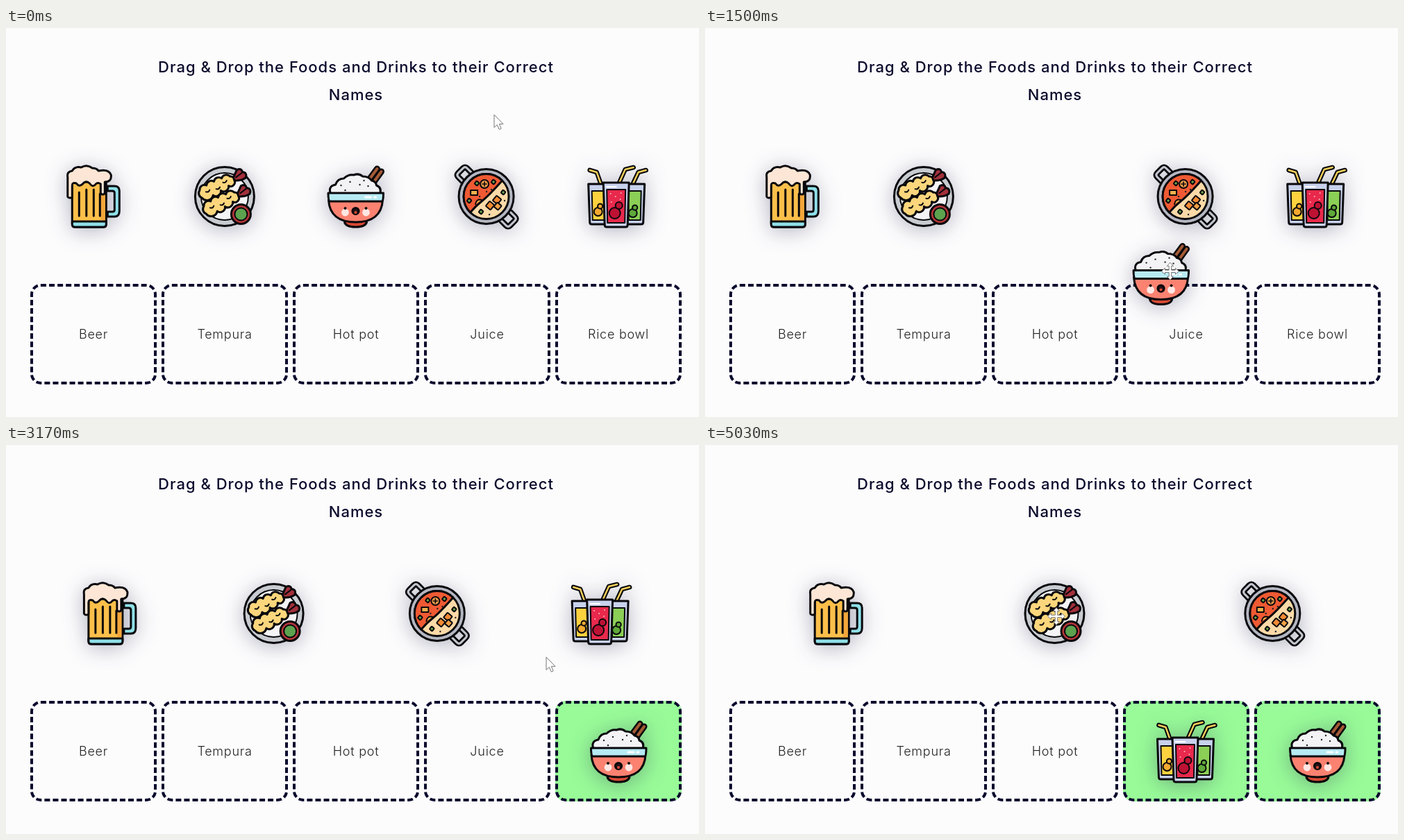
An HTML page for the animation above (5060 ms loop, 998 px wide and 561 px high).

```html
<!DOCTYPE html>
<html lang="en">
<head>
<meta charset="utf-8">
<title>Drag and drop</title>
<style>
html, body { margin: 0; width: 100%; height: 100%; overflow: hidden; background: #fcfcfd; }
#stage { position: relative; width: 998px; height: 561px; overflow: hidden; font-family: Inter, "Open Sans", sans-serif; }
h1 { position: absolute; left: 104px; top: 36px; width: 800px; margin: 0; text-align: center;
  font-size: 22px; font-weight: 500; line-height: 40px; letter-spacing: 1px; color: #0b0b2c; }
.box { position: absolute; top: 369px; width: 182px; height: 145px; box-sizing: border-box;
  border: 4px dashed #07072c; border-radius: 15px; display: flex; align-items: center; justify-content: center;
  font-size: 18px; font-weight: 300; letter-spacing: .75px; color: #222; }
.box.done { background: #98fb98; color: transparent; }
svg { position: absolute; left: 0; top: 0; overflow: visible; }
.icon { width: 92px; height: 92px; fill: none; stroke: #08080c; stroke-width: 3; stroke-linejoin: round;
  stroke-linecap: round; filter: drop-shadow(0 4px 15px rgba(30, 30, 70, .32)); }
.cursor { width: 30px; height: 30px; fill: #fff; stroke: #777; stroke-width: 1; stroke-linejoin: round; }
</style>
</head>
<body>
<div id="stage">
  <h1>Drag &amp; Drop the Foods and Drinks to their Correct<br>Names</h1>
</div>
<script>
const LOOP = 5060, BOWL_DROP = 2350, JUICE_DROP = 4400;
const stage = document.getElementById('stage');

const path = (d, fill = 'none', extra = '') => `<path d="${d}" fill="${fill}" ${extra}/>`;
const circle = (x, y, r, fill = 'none', extra = '') => `<circle cx="${x}" cy="${y}" r="${r}" fill="${fill}" ${extra}/>`;
const group = (transform, body) => `<g transform="${transform}">${body}</g>`;
const tube = (d, color, outer = 6.6, inner = 2.4) =>
  path(d, 'none', `stroke-width="${outer}"`) + path(d, 'none', `stroke="${color}" stroke-width="${inner}"`);
const dots = (points, r, fill) => points.map(([x, y]) => circle(x, y, r, fill, 'stroke="none"')).join('');
const bare = 'stroke="none"';
const thin = 'stroke-width="2"';

function beer() {
  const teal = '#8fe0e8';
  return path('M66 31H76q7 0 7 7V67q0 8-7 8H66V68H73q3 0 3-3V41q0-3-3-3H66z', teal)
    + path('M15 25V86q0 4 4 4H60q4 0 4-4V25z', '#fcbf4a')
    + path('M56 27H62.5V80H56z', '#f3a63a', bare)
    + path('M15 82H64V86q0 4-4 4H19q-4 0-4-4z', teal)
    + path('M25 40V74M35.5 36V74M46 36V74M55 42V74')
    + path('M8.5 46V18Q7 10 15 9Q19 2 28 4Q36-1 44 5Q50 5 53 9Q68 6 71 15Q72 25 62 25V40Q62 43 59 43T56 40V28Q52 25 49 28Q45 34 40 27Q35 22 30 28Q25 33 21 27Q15 25 15 30V46Q15 48 12 48T8.5 46Z', '#fde6d5');
}

function tempura() {
  const shrimp = path('M26-1L36-9Q43-9 42-3Q48 2 42 7Q34 8 26 3Z', '#a3303a')
    + path('M30 0L41-2', 'none', thin)
    + path('M-27 4a7 7 0 0 1 2-11a7 7 0 0 1 12-2a7 7 0 0 1 12 0a7 7 0 0 1 12 1a7 7 0 0 1 12 3a5 5 0 0 1 3 7a6 6 0 0 1-11 4a7 7 0 0 1-13 1a7 7 0 0 1-13 1a9 9 0 0 1-16-4z', '#fbd67c')
    + path('M-18-1q3 3 6 0M-3 2q3 3 6 0M10-2q3 3 6 0', 'none', thin);
  return circle(46, 46, 42.5, '#c8ccd1') + circle(46, 46, 34, '#f4f4f6', thin)
    + group('translate(35.5 32) rotate(-27)', shrimp)
    + group('translate(41.5 55) rotate(-27)', shrimp)
    + circle(69.5, 71.5, 14, '#b5373a') + circle(69.5, 71.5, 9, '#5da24f', thin);
}

function bowl() {
  const brown = '#a35a35';
  return tube('M63 25L77 6', brown, 9, 4) + tube('M70 28L83 10', brown, 9, 4)
    + path('M10 42Q6 31 17 29Q20 20 29 20Q35 14 43 15Q51 12 56 17Q65 17 69 23Q75 24 76 30Q84 33 81 42Z', '#f3f3f5')
    + dots([[25, 30], [38, 25], [52, 29], [64, 31], [31, 37], [58, 23]], 1.2, '#222')
    + path('M30 83Q33 80 46 80T62 83Q60 90 46 90T30 83Z', '#d94a34')
    + path('M7 51Q9 83 46 83T85 51Z', '#fb8270')
    + path('M6.5 41H86Q86 53 84 53H9Q6.5 53 6.5 41Z', '#b7ebf4')
    + path('M60 47H68M73 47H75', 'none', 'stroke="#fff"')
    + dots([[31, 69], [61, 69]], 5.4, '#ffe6e2') + dots([[31, 63], [61, 63]], 2, '#111')
    + circle(46, 67, 4.6, '#27151a') + circle(46, 69, 2, '#d94a34', bare);
}

function pot() {
  const handle = tube('M-9 5V-5Q-9-9-5-9H5Q9-9 9-5V5', '#c3c6ce', 8.6, 3);
  const cube = (x, y, s, color) => group(`translate(${x} ${y}) rotate(40)`,
    `<rect x="${-s / 2}" y="${-s / 2}" width="${s}" height="${s}" rx="1" fill="${color}" ${thin}/>`);
  return group('translate(15 15) rotate(-45)', handle) + group('translate(77 78) rotate(135)', handle)
    + circle(45.5, 46, 39.5, '#b4b7c1') + circle(45.5, 46, 32.5, '#fbdaa8')
    + path('M68.5 23A32.5 32.5 0 0 0 22.5 69Q31 59 40 52T68.5 23Z', '#ef5a33')
    + circle(43, 28, 6, '#f39a4a', thin) + path('M43 25V31M40 28H46', 'none', 'stroke-width="1.6"')
    + path('M23 37H33V44H23z', '#f6b04d', thin)
    + cube(32, 27, 5, '#6ba84e') + cube(56, 25, 5, '#6ba84e') + cube(21, 52, 5, '#6ba84e')
    + path('M30 57q1-8 9-6', '#f6b04d', thin)
    + cube(61, 51, 9, '#f18a35') + cube(51, 59, 9, '#f18a35') + cube(62, 60, 8, '#f3a047')
    + cube(70, 40, 5, '#6ba84e') + cube(38, 68, 5, '#6ba84e')
    + dots([[46, 39], [36, 46], [53, 36], [64, 72], [50, 72], [72, 52]], 1.2, '#222');
}

function juice() {
  const glass = (x, y, w, h, color) => path(`M${x} ${y}h${w}l-2 ${h - 3}q0 3-3 3h${10 - w}q-3 0-3-3z`, '#c9d2ec')
    + path(`M${x + 5} ${y + 10}h${w - 10}l-1 ${h - 16}h${12 - w}z`, color, thin);
  const fruit = (x, y, color) => circle(x, y, 6, color, thin) + circle(x + 3, y - 8, 3.6, color, thin);
  return tube('M6 8L16 11L22 28', '#f4cf5a') + tube('M69 4L57 7L48 27', '#f4cf5a') + tube('M87 8L76 11L68 28', '#f4cf5a')
    + glass(4, 28, 30, 58, '#fdd23f') + glass(56, 28, 29, 58, '#8bcf56')
    + fruit(18, 68, '#f5a92f') + fruit(68, 70, '#5fa83a')
    + glass(25.5, 26, 37, 64, '#e8294c')
    + circle(42, 70, 8, '#bd1234', thin) + circle(48, 59, 5, '#bd1234', thin)
    + dots([[36, 42], [43, 46], [51, 41], [37, 54], [50, 50]], 1, '#ffb3c0')
    + path('M30 32H44', 'none', 'stroke="#fff" stroke-width="2"');
}

function addSvg(cls, body) {
  stage.insertAdjacentHTML('beforeend', `<svg class="${cls}">${body}</svg>`);
  return stage.lastElementChild;
}

const boxes = ['Beer', 'Tempura', 'Hot pot', 'Juice', 'Rice bowl'].map((label, i) => {
  const el = document.createElement('div');
  el.className = 'box';
  el.style.left = 35 + 189 * i + 'px';
  el.textContent = label;
  return stage.appendChild(el);
});
const icons = {};
for (const draw of [beer, tempura, pot, juice, bowl]) icons[draw.name] = addSvg('icon', draw());

const arrow = addSvg('cursor', path('M0 0V18.5L4.3 14.6L7.3 21.3L10.2 20L7.3 13.5H13Z', '#fff'));
const move = addSvg('cursor', path('M-1.7-1.7V-7.5H-4.5L0-12.5L4.5-7.5H1.7V-1.7H7.5V-4.5L12.5 0L7.5 4.5V1.7H1.7V7.5H4.5L0 12.5L-4.5 7.5H-1.7V1.7H-7.5V4.5L-12.5 0L-7.5-4.5V-1.7Z', '#fff'));

// Keys are [time, x, y]
const pointerKeys = [[0, 703, 125], [60, 700, 127], [430, 514, 233], [530, 510, 237], [880, 510, 237], [1170, 538, 285],
  [1830, 818, 406], [2200, 888, 436], [2550, 888, 438], [3170, 778, 306], [3480, 846, 258], [3630, 846, 258],
  [4000, 655, 468], [4200, 682, 446], [4480, 684, 444], [4930, 507, 248], [5030, 506, 247], [LOOP, 506, 247]];
const bowlKeys = [[900, 503.5, 243], [1170, 526.5, 285], [1830, 803, 412.5], [2230, 873, 441], [BOWL_DROP, 873, 442]];
const juiceKeys = [[3650, 858, 243], [4000, 698, 410], [4230, 691, 438], [JUICE_DROP, 691, 440]];

// Cubic through the keys without overshoot
function along(keys, t) {
  const last = keys.length - 1;
  if (t <= keys[0][0]) return keys[0].slice(1);
  if (t >= keys[last][0]) return keys[last].slice(1);
  const i = keys.findIndex(k => k[0] > t) - 1;
  const span = keys[i + 1][0] - keys[i][0], u = (t - keys[i][0]) / span;
  return [1, 2].map(axis => {
    const slope = j => (keys[j + 1][axis] - keys[j][axis]) / (keys[j + 1][0] - keys[j][0]);
    const tangent = j => {
      if (j < 1 || j >= last) return 0;
      const a = slope(j - 1), b = slope(j);
      return a * b <= 0 ? 0 : 2 * a * b / (a + b);
    };
    const p = keys[i][axis], q = keys[i + 1][axis];
    return p + (q - p) * u * u * (3 - 2 * u)
      + span * u * (1 - u) * (tangent(i) * (1 - u) - tangent(i + 1) * u);
  });
}

const place = (el, x, y) => el.style.transform = `translate(${x}px, ${y}px)`;
const center = (el, x, y) => place(el, x - 46, y - 46);

function render(t) {
  const bowlDone = t >= BOWL_DROP, juiceDone = t >= JUICE_DROP;
  const row = ['beer', 'tempura', 'bowl', 'pot', 'juice']
    .filter(name => !(name === 'bowl' && bowlDone) && !(name === 'juice' && juiceDone));
  row.forEach((name, i) => center(icons[name], 32 + 943 / row.length * (i + .5), 243));

  if (bowlDone) center(icons.bowl, 882, 442);
  else if (t > 900) center(icons.bowl, ...along(bowlKeys, t));
  if (juiceDone) center(icons.juice, 693.5, 442);
  else if (t > 3650) center(icons.juice, ...along(juiceKeys, t));
  boxes[4].classList.toggle('done', bowlDone);
  boxes[3].classList.toggle('done', juiceDone);

  const moving = [[410, 2760], [3440, 4620], [4860, LOOP]].some(([a, b]) => t >= a && t < b);
  const pos = along(pointerKeys, t);
  place(arrow, ...pos);
  place(move, ...pos);
  arrow.style.visibility = moving ? 'hidden' : 'visible';
  move.style.visibility = moving ? 'visible' : 'hidden';
}

const start = performance.now();
function tick() {
  render((performance.now() - start) % LOOP);
  requestAnimationFrame(tick);
}
tick();
</script>
</body>
</html>
```
